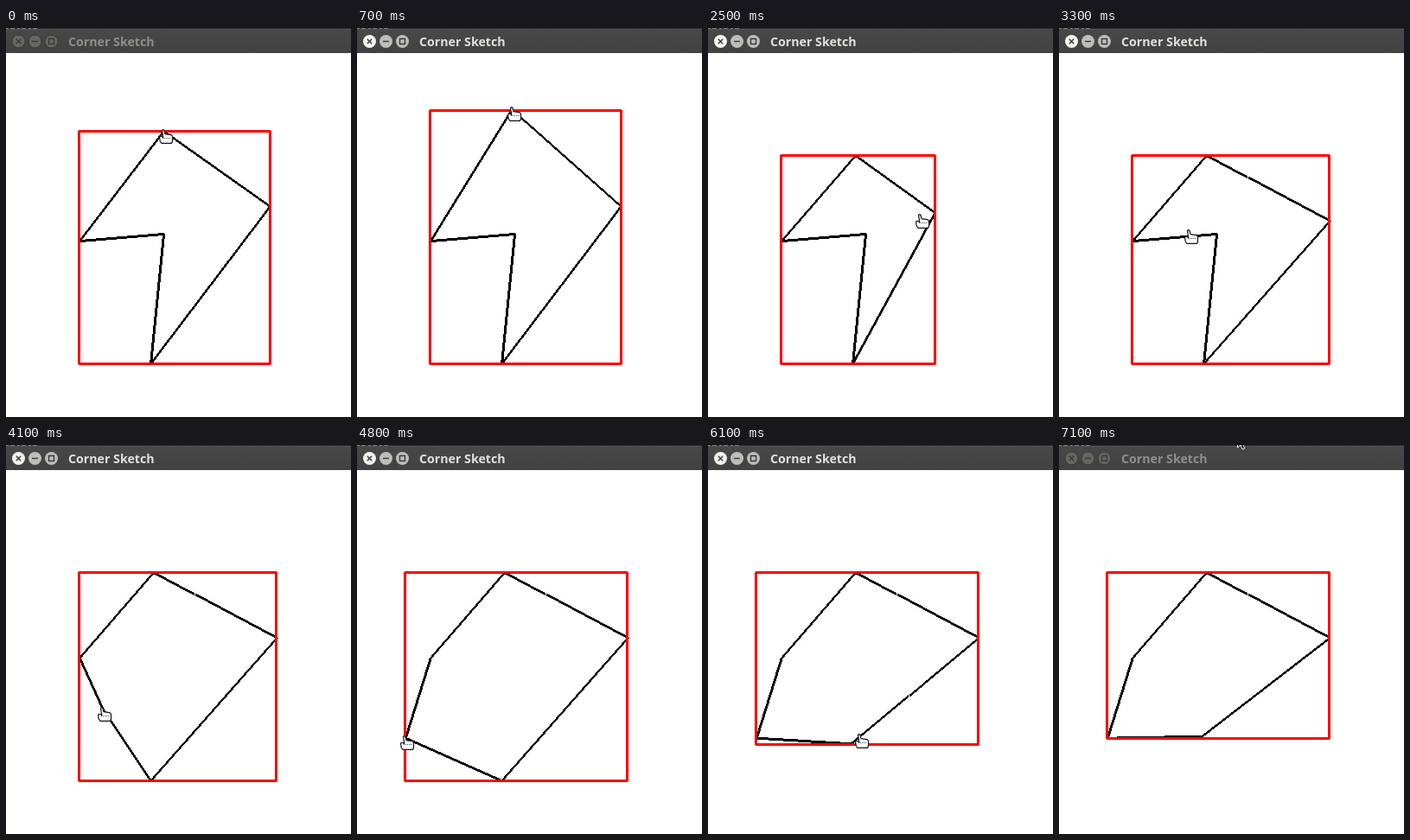
Write an HTML page with a canvas that moves like this. It is 399 px wide and 450 px high and loops after 7200 ms.

```html
<!DOCTYPE html>
<html lang="en">
<head>
<meta charset="utf-8">
<title>Corner Sketch</title>
<style>
  html, body { margin: 0; width: 100%; height: 100%; overflow: hidden; background: #fff; }
  canvas, svg { position: absolute; left: 0; top: 0; }
  .title { font: bold 14.2px "Open Sans", "Noto Sans", sans-serif; fill: #8f8e8a; }
  .button circle { fill: #66655f; stroke: #383838; }
  .button path { fill: none; stroke: #3a3a39; stroke-width: 1.4; }
  .active .title { fill: #e2e0dc; }
  .active .button circle { fill: #bebdba; stroke: none; }
  .active .close circle { fill: #f4f4f2; }
</style>
</head>
<body>
<canvas id="paper" width="399" height="450"></canvas>
<svg width="399" height="450">
  <defs>
    <linearGradient id="bar" x2="0" y2="1">
      <stop offset="0" stop-color="#484848"/>
      <stop offset="1" stop-color="#424242"/>
    </linearGradient>
  </defs>
  <g id="window">
    <rect width="399" height="29" fill="url(#bar)"/>
    <rect width="399" height="1" fill="#292929"/>
    <path d="M0 .5H38" stroke="#777" stroke-dasharray="3 2 5 3"/>
    <path d="M0 1.5H399" stroke="#555"/>
    <g class="button close" transform="translate(14.5 15.5)">
      <circle r="7.5"/><path d="M-2.7-2.7 2.7 2.7M2.7-2.7-2.7 2.7"/>
    </g>
    <g class="button" transform="translate(33.5 15.5)">
      <circle r="7.5"/><path d="M-3.5 0H3.5"/>
    </g>
    <g class="button" transform="translate(52.5 15.5)">
      <circle r="7.5"/><path d="M-3-3H3V3H-3Z"/>
    </g>
    <text class="title" x="72" y="21">Corner Sketch</text>
  </g>
  <g id="cursor" stroke-linejoin="round">
    <g id="hand">
      <path d="M3.5 1.5Q4.6-.2 6 1.5L7 5.6 13.8 6.6Q15.5 7 15.5 9V14.4L14.4 16.4H3L1.2 14 .6 9.6Q1 7.7 3 8.5L4.8 9.6Z" fill="#fff" stroke="#111" stroke-width="1.2"/>
      <path d="M4 10.5H13" stroke="#444" stroke-dasharray="1 1"/>
    </g>
    <path id="arrow" d="M.5.5V15L4 12 6.2 17 8.7 16 6.6 11.2H11Z" fill="#111" stroke="#fff"/>
  </g>
</svg>
<script>
const LOOP = 7200, STEP = 100;
const $ = id => document.getElementById(id);
const ctx = $("paper").getContext("2d");

const TOP = 0, RIGHT = 1, BOTTOM = 2, INNER = 3;
const shape = [[182, 119], [305, 206], [167, 388], [182, 238], [84.8, 246]];
const rest = [177, 117];

// The hand goes to each place in turn; with a corner it drags that corner to a spot.
const moves = [
  { wait: 300, ms: 500, hand: [173, 85], corner: TOP, spot: [178, 88] },
  { wait: 100, ms: 400, hand: [165, 142], corner: TOP, spot: [170.4, 147] },
  { wait: 100, ms: 700, hand: [287, 208] },
  { wait: 100, ms: 500, hand: [209, 220], corner: RIGHT, spot: [234, 218] },
  { wait: 0, ms: 300, hand: [294, 224], corner: RIGHT, spot: [312.7, 222.6] },
  { wait: 0, ms: 300, hand: [145, 233] },
  { wait: 100, ms: 300, hand: [178, 236] },
  { wait: 0, ms: 500, hand: [88, 320], corner: INNER, spot: [94, 322] },
  { wait: 100, ms: 500, hand: [50, 336], corner: INNER, spot: [55.7, 338.7] },
  { wait: 400, ms: 300, hand: [178, 382] },
  { wait: 100, ms: 600, hand: [168, 324], corner: BOTTOM, spot: [165, 336.7] },
  { wait: 100, ms: 600, hand: [206, -12] }
];

function pull(point, goal, p) {
  point.forEach((v, i) => point[i] = v + (goal[i] - v) * p);
}

function pose(t) {
  const points = shape.map(p => [...p]), hand = [...rest];
  let clock = 0;
  for (const move of moves) {
    clock += move.wait;
    const p = Math.min(1, Math.max(0, (t - clock) / move.ms));
    pull(hand, move.hand, p);
    if (move.spot) pull(points[move.corner], move.spot, p);
    clock += move.ms;
  }
  return { points, hand };
}

// Hard-edged line, three pixels thick across its longer axis.
function line([x1, y1], [x2, y2]) {
  const dx = x2 - x1, dy = y2 - y1;
  const steep = Math.abs(dy) > Math.abs(dx);
  const n = Math.round(Math.max(Math.abs(dx), Math.abs(dy)));
  for (let i = 0; i <= n; i++) {
    const x = Math.round(x1 + dx * i / n), y = Math.round(y1 + dy * i / n);
    if (steep) ctx.fillRect(x - 1, y, 3, 1);
    else ctx.fillRect(x, y - 1, 1, 3);
  }
}

function outline(points, color) {
  ctx.fillStyle = color;
  points.forEach((p, i) => line(p, points[(i + 1) % points.length]));
}

function draw() {
  const t = Math.floor(performance.now() % LOOP / STEP) * STEP;
  const { points, hand } = pose(t);
  const xs = points.map(p => Math.floor(p[0])), ys = points.map(p => Math.ceil(p[1]));
  const left = Math.min(...xs), right = Math.max(...xs);
  const top = Math.min(...ys), bottom = Math.max(...ys);
  ctx.clearRect(0, 0, 399, 450);
  outline(points, "#000");
  outline([[left, top], [right, top], [right, bottom], [left, bottom]], "#f00");

  const [x, y] = hand.map(Math.round);
  const overBar = y < 28;
  $("cursor").setAttribute("transform", `translate(${x} ${y})`);
  $("hand").style.display = overBar ? "none" : "";
  $("arrow").style.display = overBar ? "" : "none";
  $("window").classList.toggle("active", t >= 400 && t < 7100);
  requestAnimationFrame(draw);
}
draw();
</script>
</body>
</html>
```
